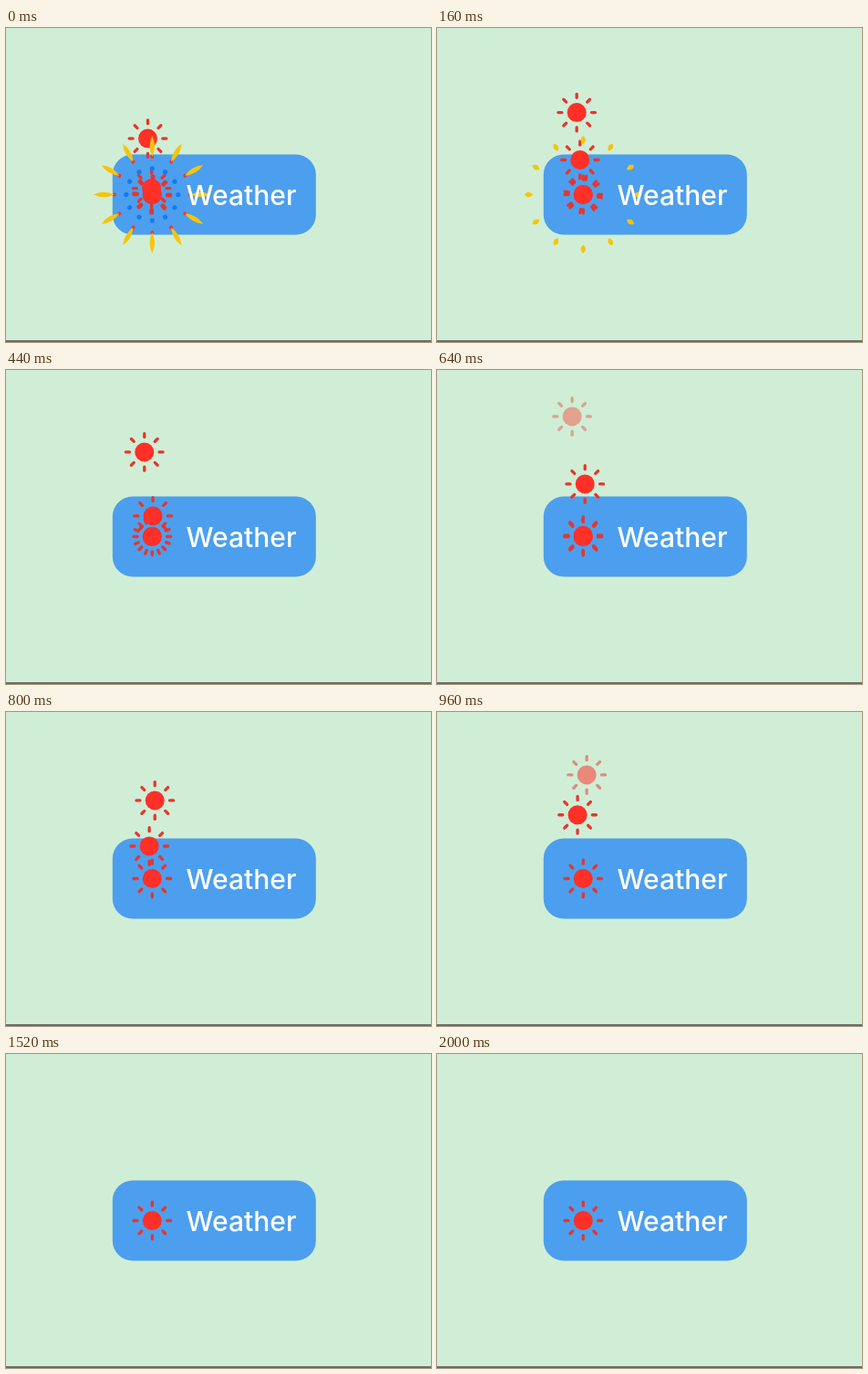
Animation of 466 by 344 pixels, one loop 2040 ms. Source, as an HTML page with a canvas:

```html
<!DOCTYPE html>
<html lang="en">
<head>
<meta charset="utf-8">
<title>Weather button</title>
<style>
  html, body { margin: 0; width: 100%; height: 100%; overflow: hidden; background: #d0eed6; }
  canvas { display: block; width: 466px; height: 344px; }
</style>
</head>
<body>
<canvas id="stage" width="466" height="344"></canvas>
<script>
const ctx = document.getElementById('stage').getContext('2d');
const LOOP = 2040, STEP = 40;
const CX = 160.3, CY = 182.5;
const RED = '#ff3028', RAY = '#e6362d', YELLOW = '#f6c40c', BLUE = '#1479f2';
const clamp = v => Math.max(0, Math.min(1, v));

// Each sun leaves the icon in a straight line; speeds are in px per second.
const suns = [
  { born: -345, rise: 178, drift: -14 },
  { born: -35, rise: 195, drift: -18 },
  { born: 311, rise: 175, drift: 6 },
  { born: 634, rise: 214, drift: -19 }
];

function disc(x, y, r, color) {
  ctx.fillStyle = color;
  ctx.beginPath();
  ctx.arc(x, y, r, 0, 2 * Math.PI);
  ctx.fill();
}

function spokes(count, turn, draw) {
  for (let i = 0; i < count; i++) {
    ctx.save();
    ctx.rotate(turn + i * 2 * Math.PI / count);
    draw();
    ctx.restore();
  }
}

function sun(x, y, turn = 0) {
  ctx.save();
  ctx.translate(x, y);
  disc(0, 0, 10.5, RED);
  ctx.strokeStyle = RAY;
  ctx.lineWidth = 3.3;
  ctx.lineCap = 'round';
  spokes(8, turn, () => {
    ctx.beginPath();
    ctx.moveTo(16.3, 0);
    ctx.lineTo(20.3, 0);
    ctx.stroke();
  });
  ctx.restore();
}

function risingSun({ born, rise, drift }, t) {
  const age = (t - born) / 1000;
  if (age < 0) return;
  ctx.globalAlpha = 1 - clamp((age - 0.55) / 0.21);
  sun(CX + drift * age, CY - rise * age);
  ctx.globalAlpha = 1;
}

// A second copy of the icon spins down into place.
function spinningSun(t) {
  const left = clamp(1 - t / 650);
  if (left > 0) sun(CX, CY, -3.85 * left ** 2);
}

function burst(t) {
  const inner = 41.5 + t * 0.085, outer = 64.5;
  const length = outer - inner;
  if (length <= 0) return;
  const mid = (inner + outer) / 2;
  const bulge = Math.min(5.4, length * 0.6);
  const dot = 1 - clamp(t / 140);
  ctx.save();
  ctx.translate(CX, CY);
  spokes(12, 0, () => {
    disc(28.5, 0, 2.6 * dot, BLUE);
    disc(inner, 0, 2 * dot, RED);
    ctx.fillStyle = YELLOW;
    ctx.beginPath();
    ctx.moveTo(inner, 0);
    ctx.quadraticCurveTo(mid, -bulge, outer, 0);
    ctx.quadraticCurveTo(mid, bulge, inner, 0);
    ctx.fill();
  });
  ctx.restore();
}

function draw(t) {
  ctx.fillStyle = '#d0eed6';
  ctx.fillRect(0, 0, 466, 344);
  ctx.fillStyle = '#6a6d6a';
  ctx.fillRect(0, 342, 466, 2);

  ctx.fillStyle = '#4c9fee';
  ctx.beginPath();
  ctx.roundRect(116.8, 138.5, 223, 88, 22);
  ctx.fill();

  sun(CX, CY);
  spinningSun(t);
  suns.forEach(s => risingSun(s, t));
  burst(t);

  ctx.fillStyle = '#fff';
  ctx.font = '500 30px Inter, "Liberation Sans", sans-serif';
  ctx.fillText('Weather', 197.5, 194);
}

function tick() {
  const t = performance.now() % LOOP;
  draw(Math.floor(t / STEP) * STEP);
  requestAnimationFrame(tick);
}
tick();
</script>
</body>
</html>
```
